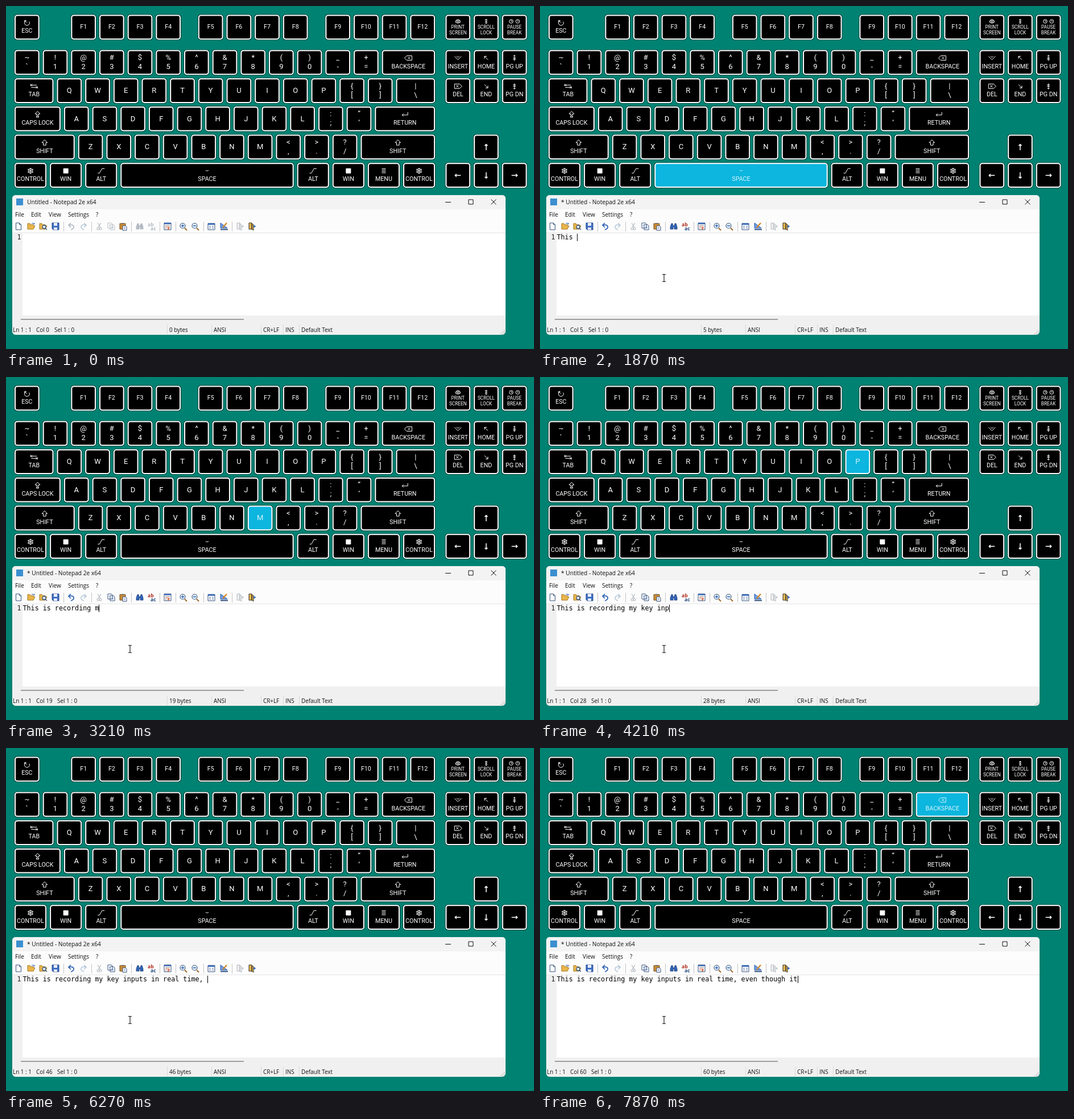
An HTML page with a canvas that plays this animation: 928 px wide and 604 px high, repeating every 8000 ms.

```html
<!DOCTYPE html>
<html lang="en">
<head>
<meta charset="utf-8">
<title>Typing on a keyboard</title>
<style>
  html, body { margin: 0; width: 100%; height: 100%; overflow: hidden; background: #008272; }
  canvas { display: block; }
</style>
</head>
<body>
<canvas id="stage" width="928" height="604"></canvas>
<script>
const ctx = document.getElementById('stage').getContext('2d');
const LOOP = 8000, HOLD = 70;
const UNIT = 49.67, KEY_H = 43.67, LEFT = 15;
const KEY_FONT = 'Roboto, sans-serif', UI_FONT = '"Open Sans", sans-serif';
const MONO_FONT = '11.71px "DejaVu Sans Mono", monospace', CHAR_W = 7.05;

// Typing: one press time per character; the last character is deleted again.
const TEXT = 'This is recording my key inputs in real time, even though its';
const PRESS = [
  1470, 1600, 1670, 1740, 1870, 1940, 2010, 2130,
  2330, 2390, 2460, 2580, 2660, 2730, 2800, 2870, 2940, 3010,
  3150, 3220, 3290, 3410, 3740, 3800, 3870,
  4000, 4070, 4210, 4280, 4400, 4470, 4610, 4680, 4760, 4830,
  4920, 4980, 5050, 5140, 5280, 5480, 5540, 5600, 5610, 6070, 6200,
  6330, 6400, 6460, 6530, 6600, 6670, 6800, 6870, 7000, 7060, 7130, 7200,
  7330, 7460, 7590];
const SHIFT_DOWN = 1210, SHIFT_UP = 1540, DELETE_AT = 7870;

// Keyboard rows: a number is a gap, a pair is [label, width], a string is one unit wide.
const F = (a, b) => Array.from({ length: b - a + 1 }, (_, i) => 'F' + (a + i));
const ROWS = [
  [15.5, ['ESC', 1, ...F(1, 4), .5, ...F(5, 8), .5, ...F(9, 12), .25,
    'PRINT\nSCREEN', 'SCROLL\nLOCK', 'PAUSE\nBREAK']],
  [77.6, ['~\n`', '!\n1', '@\n2', '#\n3', '$\n4', '%\n5', '^\n6', '&\n7', '*\n8', '(\n9', ')\n0',
    '_\n-', '+\n=', ['BACKSPACE', 2], .25, 'INSERT', 'HOME', 'PG UP']],
  [127.3, [['TAB', 1.5], ...'QWERTYUIOP', '{\n[', '}\n]', ['|\n\\', 1.5], .25, 'DEL', 'END', 'PG DN']],
  [176.9, [['CAPS LOCK', 1.75], ...'ASDFGHJKL', ':\n;', '“\n‘', ['RETURN', 2.25]]],
  [226.6, [['SHIFT', 2.25], ...'ZXCVBNM', '<\n,', '>\n.', '?\n/', ['SHIFT', 2.75], 1.25, '↑']],
  [276.3, [['CONTROL', 1.25], ['WIN', 1.25], ['ALT', 1.25], ['SPACE', 6.25], ['ALT', 1.25],
    ['WIN', 1.25], ['MENU', 1.25], ['CONTROL', 1.25], .25, '←', '↓', '→']],
];
const KEYS = ROWS.flatMap(([y, items]) => {
  let u = 0;
  const keys = [];
  for (const item of items) {
    const [label, width] = Array.isArray(item) ? item : [item, 1];
    if (typeof item === 'number') { u += item; continue; }
    keys.push({ label, x: LEFT + u * UNIT, y, w: width * UNIT - 6 });
    u += width;
  }
  return keys;
});

const ICONS = {
  'ESC': 'M-3-3A4.5 4.5 0 1 0 4-2M0 0L-4-4M-4-1V-4H-1',
  'PRINT\nSCREEN': 'M-2-1V-3H2V-1M-3 2H-4V-1H4V2H3M-2 1H2V3H-2Z',
  'SCROLL\nLOCK': 'M0-4V4M-2-2L0-4 2-2M-2 2L0 4 2 2M-2 0H2',
  'PAUSE\nBREAK': 'M-9 0a3.3 3.3 0 1 0 6.6 0a3.3 3.3 0 1 0-6.6 0M2.4 0a3.3 3.3 0 1 0 6.6 0a3.3 3.3 0 1 0-6.6 0M-5.7-2V0H-4M5.7-2V0H7',
  'BACKSPACE': 'M-7 0L-3-4H6V4H-3ZM-1-2L3 2M3-2L-1 2',
  'INSERT': 'M-6-3L0 3 6-3M-2.5-3.5L0-1 2.5-3.5',
  'HOME': 'M3 3L-3-3M-3 1V-3H1',
  'PG UP': 'M0 5V-5M-2-3L0-5 2-3M-2.5 0H2.5M-2.5 2.5H2.5',
  'TAB': 'M-6-4V0M6 0V4M-6-2H5M-3-4L-5-2-3 0M6 2H-5M3 0L5 2 3 4',
  'DEL': 'M7 0L3-4H-6V4H3ZM1-2L-3 2M-3-2L1 2',
  'END': 'M-3-3L3 3M3-1V3H-1',
  'PG DN': 'M0-5V5M-2 3L0 5 2 3M-2.5 0H2.5M-2.5-2.5H2.5',
  'CAPS LOCK': 'M-2 1V-1H-4.5L0-5.5 4.5-1H2V1ZM-2 3H2V5H-2Z',
  'RETURN': 'M5-4V1H-5M-2.5-1.5L-5 1-2.5 3.5',
  'SHIFT': 'M-2.3 4.5V0H-4.8L0-5 4.8 0H2.3V4.5Z',
  'CONTROL': 'M-4 0a4 4 0 1 0 8 0a4 4 0 1 0-8 0M0-5.5V5.5M-5-3L5 3M-5 3L5-3',
  'WIN': 'M-4-4H4V4H-4Z',
  'ALT': 'M-6 4H-3L1.5-4H6',
  'SPACE': 'M-2.5-1Q0 1.5 2.5-1',
  'MENU': 'M-3.5-4H3.5M-3.5-1.5H3.5M-3.5 1H3.5M-3.5 3.5H3.5',
  '↑': 'M0 5.5V-5M-2.5-2.5L0-5 2.5-2.5',
  '↓': 'M0-5.5V5M-2.5 2.5L0 5 2.5 2.5',
  '←': 'M5 0H-5M-2.5-2.5L-5 0-2.5 2.5',
  '→': 'M-5 0H5M2.5-2.5L5 0 2.5 2.5',
};

function shape(x, y, path, fill, stroke, width = 1) {
  const p = new Path2D(path);
  ctx.save();
  ctx.translate(x, y);
  ctx.lineWidth = width;
  if (fill) { ctx.fillStyle = fill; ctx.fill(p); }
  if (stroke) { ctx.strokeStyle = stroke; ctx.stroke(p); }
  ctx.restore();
}

function rect(x, y, w, h, color) {
  ctx.fillStyle = color;
  ctx.fillRect(x, y, w, h);
}

function text(str, x, y, font, color = '#111', align = 'left') {
  ctx.font = font;
  ctx.textAlign = align;
  ctx.fillStyle = color;
  ctx.fillText(str, x, y);
}

function drawKey({ label, x, y, w }, lit) {
  const ink = lit ? '#d8f3fb' : '#fff';
  ctx.beginPath();
  ctx.roundRect(x - .3, y - .3, w + .6, KEY_H + .6, 5);
  ctx.strokeStyle = 'rgba(0,0,0,.6)';
  ctx.lineWidth = 1.2;
  ctx.stroke();
  ctx.beginPath();
  ctx.roundRect(x + 1, y + 1, w - 2, KEY_H - 2, 4);
  ctx.fillStyle = lit ? '#0cb6de' : '#000';
  ctx.fill();
  ctx.strokeStyle = '#fff';
  ctx.lineWidth = 2;
  ctx.stroke();

  const cx = x + w / 2, icon = ICONS[label], lines = label.split('\n');
  const legend = (str, dy, size) =>
    text(str, cx, y + dy + size * .355, `${size}px ${KEY_FONT}`, ink, 'center');
  if (icon) {
    const arrow = '←↑→↓'.includes(label);
    const dy = arrow ? 22 : lines[1] ? 11.5 : 14;
    shape(cx, y + dy, icon, label === 'WIN' && ink, ink, arrow ? 1.5 : 1);
    if (arrow) return;
    if (lines[1]) lines.forEach((line, i) => legend(line, 21.5 + 10 * i, 8.3));
    else legend(label, 28.2, 10.7);
  } else if (lines[1]) {
    lines.forEach((line, i) => legend(line, 12.8 + 15.8 * i, 13));
  } else {
    legend(label, 21.2, label.length > 1 ? 10.7 : 13);
  }
}

function drawToolbar(edited) {
  const y = 388, grey = '#b4bac2', blue = '#2f62b5', dark = '#34507c', gold = '#e9b64b';
  const on = color => edited ? color : grey;
  const icon = (x, ...parts) => parts.forEach(part => shape(x, y, ...part));
  for (const x of [101, 150, 220, 270, 298, 347, 397]) rect(x, 380, 1, 17, '#c4c4c4');

  const page = 'M-4.5-6H1.5L4.5-3V6H-4.5ZM1.5-6V-3H4.5';
  const folder = 'M-6 5V-5H-2L-1-3H4V-1H7L4 5Z';
  icon(22, [page, '#fff', dark]);
  icon(44, [folder, gold, '#a87824'], ['M1-5Q4-7 6-4M6-6V-4H4', null, blue]);
  icon(65, [folder, gold, '#a87824'], ['M-1 1a3 3 0 1 0 6 0a3 3 0 1 0-6 0M4 3L7 6', '#dcecf8', dark, 1.3]);
  icon(87, ['M-6-6H6V6H-4L-6 4Z', '#3f6fc4', '#27478a'], ['M-3-6H3V-1H-3ZM-3 2H3V6H-3Z', '#eef3fb']);

  const undo = 'M-1 6Q5 4 4 0Q2-4-4-2M-1-6L-5-2-1 2';
  icon(115, [undo, null, on(blue), 1.7]);
  icon(136, ['M1 6Q-5 4-4 0Q-2-4 4-2M1-6L5-2 1 2', null, '#b4c6da', 1.5]);

  icon(164, ['M-3-6L2 2M3-6L-2 2M-4 4a2 2 0 1 0 4 0a2 2 0 1 0-4 0M0 4a2 2 0 1 0 4 0a2 2 0 1 0-4 0', null, grey, 1.2]);
  icon(185, ['M-6-6H0L2-4V3H-6ZM-2-3H4L6-1V6H-2Z', '#fff', on(dark)],
    ['M-4-2H-2M0 1H4M0 3H4', null, on('#6f93cf')]);
  icon(206, ['M-6-5H4V5H-6Z', '#c98b34', '#7c5320'], ['M-3-6H1V-4H-3Z', '#777'],
    ['M-1-1H4L6 1V7H-1Z', '#fff', dark], ['M1 2H4M1 4H4', null, '#6f93cf']);

  icon(235, ['M-6 5V1L-4-5H-2L-1-1H1L2-5H4L6 1V5H1V1H-1V5Z', on(blue), on('#24467f'), .8]);
  text('ab', 249, 388, `bold 8.5px ${UI_FONT}`, on('#b02a1c'));
  text('ac', 254, 395, `bold 8.5px ${UI_FONT}`, on('#24467f'));

  icon(284, ['M-6-6H6V6H-6Z', '#fff', dark], ['M-6-5H6', null, blue, 2],
    ['M-4-2H4M-4 4H-2', null, '#777'], ['M-4 1H3V4H0M2 2L0 4 2 6', null, '#c8431c']);
  const lens = ['M-6-1a4.5 4.5 0 1 0 9 0a4.5 4.5 0 1 0-9 0', '#e3f0fb', '#4b5f7c', 1.2];
  const grip = ['M2 3L6 7', null, '#a06a28', 2];
  icon(312, lens, grip, ['M-4-1H1M-1.5-3.5V1.5', null, blue, 1.3]);
  icon(333, lens, grip, ['M-4-1H1', null, blue, 1.3]);
  icon(361, ['M-6-5H6V6H-6Z', '#fff', dark], ['M-6-4H6', null, blue, 2.4],
    ['M-4 0H-1M1 0H4M-4 3H-1M1 3H4', null, '#7c95bd', 1.4]);
  icon(383, ['M-6-6V3H6Z', '#6f9ce0', blue], ['M-2 2L5-6', null, '#d68a28', 2.4], ['M-6 5.5H7', null, dark, 2]);

  const door = 'M-5-6H0V5H-5ZM0-5L3-3V7L0 5Z';
  icon(411, [door, '#eee', grey], ['M3 0H7M5-2V2', null, grey]);
  icon(432, [door, gold, '#333'], ['M7 0H3M5-2L3 0 5 2', null, blue, 1.3]);
}

function drawWindow(count, edited, caret) {
  ctx.save();
  ctx.beginPath();
  ctx.roundRect(11, 333, 867, 246, 6);
  ctx.clip();
  rect(11, 333, 867, 246, '#f0f0f0');
  rect(11, 333, 867, 25, '#f3f3f3');
  rect(11, 358, 867, 41, '#fcfcfc');
  rect(11, 399, 867, 1, '#e4e4e4');
  rect(29, 400, 849, 145, '#fff');

  rect(18, 339, 12, 12, '#3b8fd0');
  text((edited ? '* ' : '') + 'Untitled - Notepad 2e x64', 37, 349, `10.2px ${UI_FONT}`);
  shape(777, 345, 'M-5 .5H5', null, '#111');
  shape(817, 345, 'M-4-4H4V4H-4Z', null, '#111');
  shape(857, 345, 'M-4.5-4.5L4.5 4.5M4.5-4.5L-4.5 4.5', null, '#111');
  [['File', 16], ['Edit', 44], ['View', 75], ['Settings', 109], ['?', 158]]
    .forEach(([name, x]) => text(name, x, 371, `10px ${UI_FONT}`));
  drawToolbar(edited);

  text('1', 19.5, 411, MONO_FONT, '#222');
  text(TEXT.slice(0, count), 29.5, 411, MONO_FONT, '#000');
  if (caret) rect(Math.round(29.5 + count * CHAR_W), 401, 1, 13, '#000');

  rect(26, 551, 392, 1.5, '#858585');
  for (const x of [283, 361, 448, 487, 515]) rect(x, 561, 1, 17, '#d9d9d9');
  [['Ln 1 : 1', 12], ['Col ' + count, 53], ['Sel 1 : 0', count > 9 ? 90 : 85], [count + ' bytes', 287],
    ['ANSI', 365], ['CR+LF', 452], ['INS', 491], ['Default Text', 519]]
    .forEach(([str, x]) => text(str, x, 574, `9.9px ${UI_FONT}`));
  for (let i = 0; i < 3; i++)
    for (let j = 0; j <= i; j++) rect(875 - 3 * j, 571 + 3 * i - 0.5, 1.5, 1.5, '#b5b5b5');
  ctx.restore();
}

function drawPointer(t) {
  if (t < 70) return;
  const u = Math.min(1, (t - 70) / 600), ease = 1 - (1 - u) ** 2;
  const x = 350 + (218 - 350) * ease, y = 149 + (479 - 149) * ease;
  if (y > 400) shape(x, y, 'M-3-6.5H-1L0-5.5 1-6.5H3M0-5.5V5.5M-3 6.5H-1L0 5.5 1 6.5H3', null, '#222', 1.2);
  else shape(x, y, 'M0 0V15L3.5 11.5 6 17 8.5 16 6 10.5H11Z', '#fff', '#000');
}

function keyFor(char) {
  if (char === ' ') return 'SPACE';
  return char === ',' ? '<\n,' : char.toUpperCase();
}

function pressedKeys(t) {
  const labels = PRESS.flatMap((at, i) => t >= at && t < at + HOLD ? keyFor(TEXT[i]) : []);
  if (t >= SHIFT_DOWN && t < SHIFT_UP) labels.push('SHIFT');
  if (t >= DELETE_AT) labels.push('BACKSPACE');
  return labels.map(label => KEYS.find(key => key.label === label));
}

function draw(t) {
  rect(0, 0, 928, 604, '#008272');
  const pressed = pressedKeys(t);
  KEYS.forEach(key => drawKey(key, pressed.includes(key)));
  const typed = PRESS.filter(at => t >= at).length;
  const caret = t >= PRESS[0] || (t >= 670 && t < SHIFT_DOWN);
  drawWindow(typed - (t >= DELETE_AT), typed > 0, caret);
  drawPointer(t);
}

const start = performance.now();
function tick() {
  draw((performance.now() - start) % LOOP);
  requestAnimationFrame(tick);
}
tick();
</script>
</body>
</html>
```
